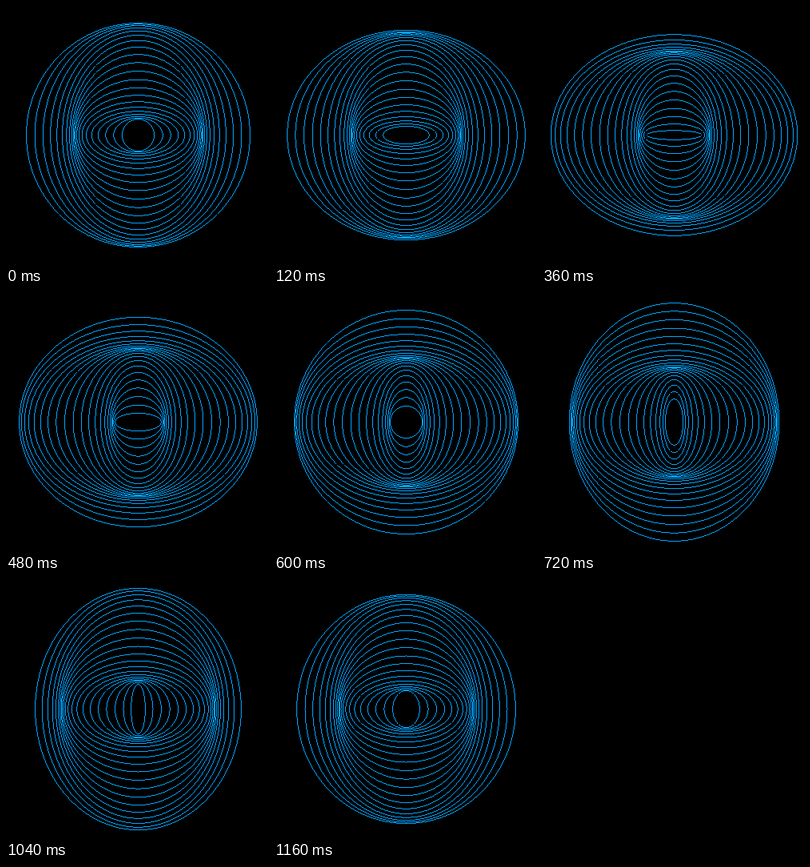
Animation, 328 px wide and 324 px high, one loop 1200 ms. Source, as an HTML page with a canvas:

```html
<!DOCTYPE html>
<html lang="en">
<head>
<meta charset="utf-8">
<title>Breathing ellipses</title>
<style>
  html, body { margin: 0; width: 100%; height: 100%; overflow: hidden; background: #000; }
  canvas { display: block; }
</style>
</head>
<body>
<canvas id="stage" width="328" height="324"></canvas>
<script>
  const ctx = document.getElementById('stage').getContext('2d');
  const CX = 165, CY = 161;
  const COUNT = 21, INNER = 20, GAP = 6, SWING = 15;
  const LOOP = 1200, STEP = 40;

  // One point mirrored into all four quadrants
  function plot(x, y) {
    ctx.fillRect(CX + x, CY + y, 1, 1);
    ctx.fillRect(CX - x, CY + y, 1, 1);
    ctx.fillRect(CX + x, CY - y, 1, 1);
    ctx.fillRect(CX - x, CY - y, 1, 1);
  }

  // Crisp one-pixel outline: columns on the flat part, rows on the steep part
  function ellipse(rx, ry) {
    const diag = Math.hypot(rx, ry);
    const endX = rx * rx / diag, endY = ry * ry / diag;
    for (let x = 0; x <= endX; x++) {
      plot(x, Math.round(ry * Math.sqrt(1 - (x / rx) ** 2)));
    }
    for (let y = 0; y <= endY; y++) {
      plot(Math.round(rx * Math.sqrt(1 - (y / ry) ** 2)), y);
    }
  }

  function draw(step) {
    const turn = 2 * Math.PI * step * STEP / LOOP;
    ctx.fillStyle = '#000';
    ctx.fillRect(0, 0, 328, 324);
    ctx.fillStyle = '#00a2ff';
    for (let i = 0; i < COUNT; i++) {
      const r = INNER + GAP * i;
      const d = SWING * Math.sin(turn + 2 * Math.PI * i / (COUNT - 1));
      ellipse(r + d, r - d);
    }
  }

  const start = performance.now();
  let shown = -1;
  function tick() {
    const step = Math.floor((performance.now() - start) % LOOP / STEP);
    if (step !== shown) draw(shown = step);
    requestAnimationFrame(tick);
  }
  tick();
</script>
</body>
</html>
```
